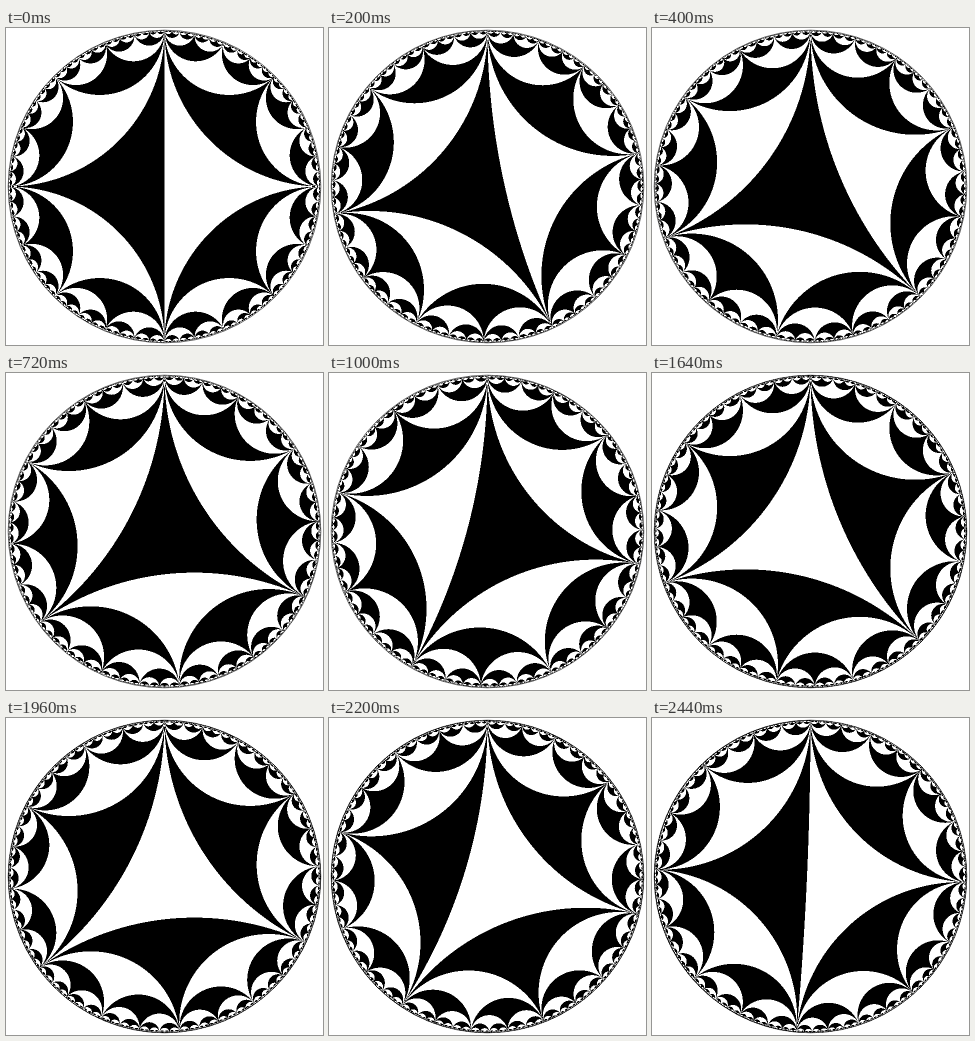
Write an HTML page with a canvas that moves like this. It is 317 by 317 pixels and loops after 2480 ms.

```html
<!DOCTYPE html>
<html>
<head>
<meta charset="utf-8">
<style>
html, body { margin: 0; width: 100%; height: 100%; overflow: hidden; background: #fff; }
canvas { display: block; }
</style>
</head>
<body>
<canvas id="stage" width="317" height="317"></canvas>
<script>
const SIZE = 317, CENTER = 158.5, RADIUS = 156.3;
const LOOP = 2480, STEP = 40, SAMPLES = 2, DEPTH = 9;
const { PI, sin, cos } = Math;
const ctx = document.getElementById('stage').getContext('2d');
const image = ctx.createImageData(SIZE, SIZE);
const pixels = new Uint32Array(image.data.buffer);

// Angles run from the bottom of the circle, positive to the right.
// Swing of a corner from the bottom (v = 0) to the right (v = 1).
const swing = v => PI / 180 * (90 * v + 15 * sin(PI * v) + 3.5 * sin(2 * PI * v));

// Number of geodesics between a point of the disk and the middle triangle.
// Each arc of the rim is halved by the next corner.
function edgesCrossed(px, py, left, right) {
  const x = (px - CENTER) / RADIUS, y = (py - CENTER) / RADIUS;
  const r2 = x * x + y * y;
  const angle = Math.atan2(x, y), chord = 2 * Math.sqrt(r2) / (1 + r2);
  let [from, to] = angle < left ? [-PI, left] : angle < right ? [left, right] : [right, PI];
  let count = 0;
  while (count < DEPTH) {
    const middle = (from + to) / 2;
    if (chord * cos(angle - middle) <= cos((to - from) / 2)) break;
    if (angle < middle) to = middle; else from = middle;
    count++;
  }
  return count;
}

function draw(time) {
  const turns = time / LOOP * 2, flips = Math.floor(turns), u = turns - flips;
  const left = -swing(1 - u), right = swing(u);
  for (let y = 0, i = 0; y < SIZE; y++) {
    for (let x = 0; x < SIZE; x++) {
      let white = 0;
      for (let a = 0.5; a < SAMPLES; a++)
        for (let b = 0.5; b < SAMPLES; b++) {
          const px = x + a / SAMPLES, py = y + b / SAMPLES;
          const outside = Math.hypot(px - CENTER, py - CENTER) > RADIUS;
          white += outside ? 1 : (edgesCrossed(px, py, left, right) + flips) & 1;
        }
      pixels[i++] = 0xff000000 | Math.round(255 * white / SAMPLES ** 2) * 0x010101;
    }
  }
  ctx.putImageData(image, 0, 0);
  ctx.lineWidth = 0.6;
  ctx.beginPath();
  ctx.arc(CENTER, CENTER, RADIUS, 0, 2 * PI);
  ctx.stroke();
}

let last = -1;
function tick() {
  const time = Math.floor(performance.now() % LOOP / STEP) * STEP;
  if (time !== last) draw(last = time);
  requestAnimationFrame(tick);
}
tick();
</script>
</body>
</html>
```
